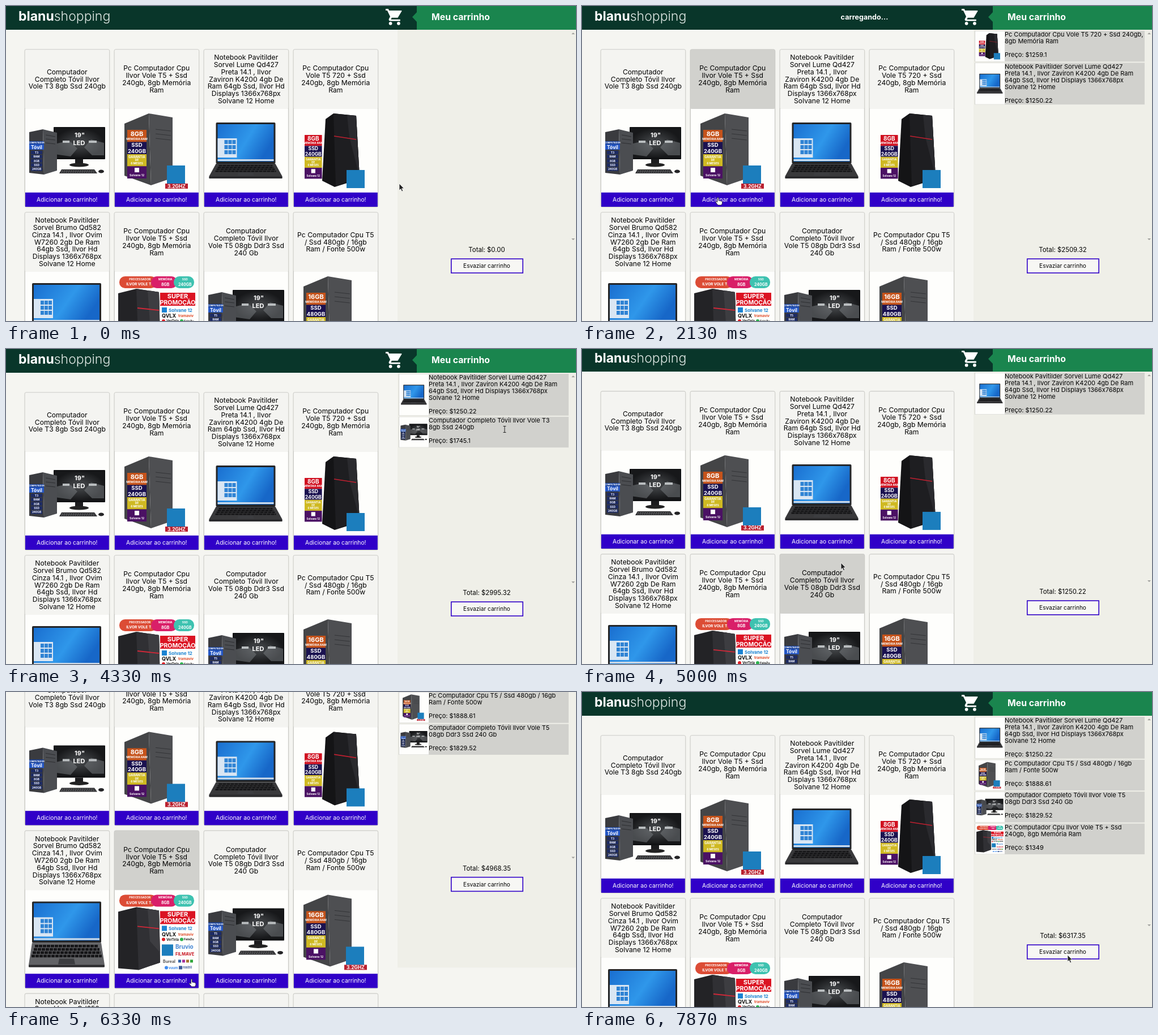
Write an HTML page that moves like this. It is 1006x557 px and loops after 8 s.

```html
<!DOCTYPE html>
<html lang="pt-BR">
<head>
<meta charset="utf-8">
<title>Carrinho</title>
<style>
  html, body { margin: 0; width: 100%; height: 100%; overflow: hidden; background: #f5f5f1; }
  svg { display: block; width: 1006px; height: 557px; font-family: Inter, sans-serif; }
</style>
</head>
<body>
<script>
// "|" breaks a line on the card, "~" breaks it in the cart.
const PRODUCTS = [
  ['Computador|Completo Tóvil Ilvor|Vole T3~8gb Ssd 240gb', 1745.1],
  ['Pc Computador Cpu|Ilvor Vole T5 + Ssd|~240gb, 8gb Memória|Ram', 1445.69],
  ['Notebook Pavitilder|Sorvel Lume Qd427|~Preta 14.1 , Ilvor|Zaviron K4200 4gb De|Ram~64gb Ssd, Ilvor Hd|Displays 1366x768px|~Solvane 12 Home', 1250.22],
  ['Pc Computador Cpu|Vole T5 720 + Ssd|240gb,~8gb Memória|Ram', 1259.1],
  ['Notebook Pavitilder|Sorvel Brumo Qd582|Cinza 14.1 , Ilvor Ovim|W7260 2gb De Ram|64gb Ssd, Ilvor Hd|Displays 1366x768px|Solvane 12 Home'],
  ['Pc Computador Cpu|Ilvor Vole T5 + Ssd|~240gb, 8gb Memória|Ram', 1349],
  ['Computador|Completo Tóvil Ilvor|Vole T5~08gb Ddr3 Ssd|240 Gb', 1829.52],
  ['Pc Computador Cpu T5|/ Ssd 480gb / 16gb|~Ram / Fonte 500w', 1888.61],
  ['Notebook Pavitilder|Sorvel Lume Qd250|Preta 14.1 , Ilvor|Zaviron K4200 4gb De|Ram 64gb Ssd, Ilvor Hd|Displays 1366x768px|Solvane 12 Home'],
  [''], [''], ['']
];

// Pointer stops: time, place and what the click there adds to or takes from the cart
const STOPS = [
  [0, 694, 314], [800, 580, 344, '+4'], [1530, 415, 342, '+3'], [1930, 240, 339, '+2'], [2470, 112, 340, '+1'],
  [3200, 884, 186], [3600, 888, 70, '-4'], [4130, 880, 142, '-2'], [4470, 880, 142, '-1'],
  [5000, 457, 378], [5330, 543, 454], [5600, 548, 503, '+8'], [6000, 395, 508, '+7'], [6400, 310, 508, '+6'],
  [6730, 579, 378], [7600, 890, 485], [7870, 857, 465]
];
const LATENCY = 270, TRAVEL = 240;

const rect = (x, y, w, h, fill, more = '') =>
  `<rect x="${x}" y="${y}" width="${w}" height="${h}" fill="${fill}" ${more}/>`;
const dot = (x, y, r, fill) => `<circle cx="${x}" cy="${y}" r="${r}" fill="${fill}"/>`;
const path = (d, fill, more = '') => `<path d="${d}" fill="${fill}" ${more}/>`;
const line = (d, color, more = '') => path(d, 'none', `stroke="${color}" ${more}`);
const group = (x, y, body, scale = 1) => `<g transform="translate(${x} ${y}) scale(${scale})">${body}</g>`;
const repeat = (count, make) => Array.from({ length: count }, (_, i) => make(i)).join('');
// Text placed by its vertical centre
const text = (x, y, str, size, fill = '#000', more = '') =>
  `<text x="${x}" y="${y + size * .36}" font-size="${size}" fill="${fill}" ${more}>${str}</text>`;
const MID = 'text-anchor="middle"', BOLD = 'font-weight="700"', BOLD_MID = MID + ' ' + BOLD;
const caption = (x, y, str, size) => text(x, y, str, size, '#fff', BOLD_MID);

// Product pictures, each in a 148 x 148 box
const badge = (x, y) => rect(x, y, 32, 32, '#1c7ebd');

const labels = (x, y, scale, ram, ssd, color) => group(x, y,
  ['MEMÓRIA RAM', ssd, '6 MESES', 'Solvane 12'].map((s, i) =>
    rect(0, i * 21.5, 34, 21.5, [color, '#1b1250', '#cfb922', '#4b1164'][i]) +
    caption(17, i * 21.5 + 16, s, i === 1 ? 9.5 : 5)).join('') +
  caption(17, 7, ram, 11) + caption(17, 27, 'SSD', 9.5) +
  caption(17, 48, 'GARANTIA', 5.5) + caption(17, 53.5, 'DE', 5) + rect(13, 67, 8, 8, '#fff'), scale);

const tower = (ram, ssd) =>
  path('M17 26 60 8 64 135 17 118z', '#444547') + path('M60 8 102 15V122L64 135z', '#4e4f52') +
  line('M72 36l27 3M72 44l27 3M72 52l27 3', '#333437') +
  labels(22, 37, 1, ram, ssd, '#c5531b') +
  badge(92, 100) + rect(89, 132, 40, 9, '#b9202f') + caption(109, 136.5, '3.2GHZ', 8.5);

const blackTower =
  path('M56 18 70 8 110 12 116 120 110 126 72 138 50 127z', '#141416') +
  path('M70 8 110 12 116 120 74 137z', '#1e1e21') + path('M94 11 110 12 116 120 98 50z', '#2a2a2e') +
  line('M71 48 110 54', '#c02030', 'stroke-width="1.6"') +
  labels(19, 46, .9, '8GB', '240GB', '#d01020') + badge(93, 108);

const desktop = chip =>
  rect(50, 32, 91, 57, '#111214', 'rx="1"') + rect(52, 34, 87, 52, 'url(#photo)') +
  path('M52 62 78 56 92 70 80 84 52 80zM139 60 116 54 104 68 118 82 139 82z', '#7d8083', 'opacity=".5"') +
  line('M66 58h12M112 58h14', '#b9bdbf', 'stroke-width="4"') +
  caption(96, 46, '19"', 11) + caption(95, 60, 'LED', 11) +
  rect(88, 89, 14, 9, '#1c1c1e') + '<ellipse cx="95" cy="99" rx="17" ry="3.5" fill="#222"/>' +
  path('M7 41 31 36 33 116 7 113z', '#3a3b3f') + path('M31 36 56 42V109L33 116z', '#4b4d51') +
  line('M36 46l17 3M36 53l17 2M36 60l17 2', '#2d2e31') +
  rect(7, 57, 26, 6, '#1d46a0') + caption(20, 60, 'COMPUTADOR', 3.8) +
  rect(7, 63, 26, 9, '#2456c4') + caption(20, 67.5, 'Tóvil', 8.5) +
  [chip, 'RAM', '8GB', 'SSD', '240GB'].map((s, i) =>
    rect(10, 74 + i * 7.4, 20, 6, '#1d2b63') + caption(20, 77 + i * 7.4, s, 4.8)).join('') +
  path('M64 107H122L127 114H60z', '#2a2a2c') +
  line('M64 109.5H122M63 112H124', '#77797c', 'stroke-dasharray="3 1"') +
  '<ellipse cx="134" cy="110.5" rx="5" ry="3" fill="#242426"/>';

const laptop = (width, top, overhang, depth, color) => {
  const left = 73 - width / 2, right = 73 + width / 2, hinge = top + 73, front = hinge + depth;
  return rect(left, top, width, 73, '#242527', 'rx="2"') +
    rect(left + 3, top + 3, width - 6, 66, 'url(#sky)') +
    rect(left + 3, top + 28, 34, 34, '#d9e6f3') +
    repeat(9, i => rect(left + 15 + i % 3 * 7, top + 31 + Math.floor(i / 3) * 9, 6, 7, '#2f83d4')) +
    rect(left + 3, hinge - 8, width - 6, 3, '#cfdbe8') +
    path(`M${left} ${hinge}H${right}L${right + overhang} ${front}v4H${left - overhang}v-4z`, color) +
    rect(left - overhang, front, width + 2 * overhang, 4, '#2b2b2d', 'rx="2"') +
    repeat(4, i => line(`M${left + 5 - i * 2} ${hinge + depth * (.15 + i * .15)}H${right - 5 + i * 2}`, '#151517',
      `stroke-width="${depth * .12}" stroke-dasharray="6 1"`)) +
    path(`M60 ${hinge + depth * .72}H86L88 ${front - 1}H58z`, '#3c3d40');
};

const pill = (x, w, color, top, bottom, size) => rect(x, 8, w, 21, color, 'rx="10"') +
  caption(x + w * .55, 13, top, 5) + caption(x + w * .55, 22, bottom, size);
const brand = (x, y, name, size, color) => text(x, y, name, size, color, BOLD);
const promo =
  pill(8, 66, '#dc4c35', 'PROCESSADOR', 'ILVOR VOLE T5', 6.6) +
  pill(64, 46, '#d91f68', 'MEMÓRIA', '8GB', 7) + pill(104, 36, '#3ec2b0', 'SSD', '240GB', 7) +
  path('M6 38 38 30 78 36 80 128 42 141 6 138z', '#232326') + path('M38 30 78 36 80 128 42 141z', '#303034') +
  path('M58 33 78 36 80 110 62 90z', '#3d3d41') + line('M40 64 78 68', '#d02838', 'stroke-width="1.8"') +
  rect(80, 37, 62, 23, '#db1322') + caption(111, 43, 'SUPER', 11) + caption(111, 54, 'PROMOÇÃO', 10.5) +
  rect(83, 63, 9, 9, '#1b83d2') + brand(95, 68, 'Solvane 12', 8, '#1b83d2') +
  brand(83, 78, 'QVLX', 9, '#111') + brand(112, 78, 'tramaviv', 6.3, '#e04a28') +
  dot(86, 87, 3, '#dd1c24') + brand(91, 87, 'VerTela', 6, '#222') +
  dot(118, 87, 3, '#2bb24c') + brand(122, 87, 'FalaZu', 5.4, '#222') +
  rect(83, 96, 20, 20, '#1c7ebd') + brand(107, 100, 'Bruvio', 10, '#4285d4') +
  brand(107, 113, 'FILMAVE', 7.6, '#c91824') + brand(85, 126, 'Bureal', 7, '#555') +
  repeat(4, i => rect(112 + i * 7, 123, 5, 5, `hsl(${215 + i * 90} 55% 42%)`)) +
  dot(91, 137, 3, '#3f8cf0') + brand(95, 137, 'vuum', 6, '#3f8cf0') +
  rect(113, 134, 6, 6, '#3b5998') + brand(120, 137, 'rostril', 5.6, '#3b5998');

const ART = [desktop('T3'), tower('8GB', '240GB'), laptop(105, 24, 12, 22, '#39393b'), blackTower,
  laptop(122, 20, 6, 39, '#626366'), promo, desktop('T5'), tower('16GB', '480GB')];

const card = ([title], i) => {
  const lines = title.split('|');
  return group(33.3 + i % 4 * 158, 77 + Math.floor(i / 4) * 288,
    rect(0, 0, 149.2, 278.2, '#f4f4f1', 'rx="3" stroke="#cbcbc7" stroke-width="1.6"') +
    rect(.3, .3, 148.6, 104.7, '#f4f4f1', 'class="head" rx="2"') +
    rect(.7, 105, 147.8, 148, '#fefefc') + (ART[i] ? `<use href="#art${i}" x=".7" y="105"/>` : '') +
    rect(.7, 252.8, 147.8, 25.2, '#3000c8') + text(74.5, 265, 'Adicionar ao carrinho!', 10.3, '#fff', MID) +
    lines.map((s, n) => text(74.5, 52.3 + (n - (lines.length - 1) / 2) * 12.8,
      s.replace('~', ' ').trim(), 12.2, '#000', MID)).join(''));
};

const cartLines = id => PRODUCTS[id - 1][0].split('~');
const rowHeight = id => cartLines(id).length > 2 ? 75.8 : 56.4;
const sumOf = (ids, value) => [...ids].reduce((sum, id) => sum + value(id), 0);

const cartList = ids => [...ids].map((id, i) => {
  const h = rowHeight(id) - 2;
  return group(693, 44 + sumOf(ids.slice(0, i), rowHeight),
    rect(0, 0, 300, h, '#d1d1cd') + rect(1, .5, 52, h - 1, '#fefefc') +
    group(1, (h - 52) / 2, `<use href="#art${id - 1}"/>`, .352) +
    [...cartLines(id), '', 'Preço: $' + PRODUCTS[id - 1][1]].map((s, n) =>
      text(53, 6.3 + n * 12, s.replaceAll('|', ' ').trim(), 11)).join(''));
}).join('');
const cartTotal = ids => 'Total: $' + (ids ? +sumOf(ids, id => PRODUCTS[id - 1][1]).toFixed(2) : '0.00');

document.body.innerHTML = `<svg viewBox="0 0 1006 557"><defs>
  <linearGradient id="sky" x2="1" y2=".4"><stop stop-color="#1a6fd0"/><stop offset=".6" stop-color="#2f97ea"/><stop offset="1" stop-color="#1767c8"/></linearGradient>
  <radialGradient id="photo"><stop stop-color="#4a4d50"/><stop offset="1" stop-color="#17181a"/></radialGradient>
  ${ART.map((body, i) => `<g id="art${i}">${body}</g>`).join('')}</defs>
  <g id="page">
    ${rect(691, 42, 315, 565, '#efefe8')}
    ${rect(0, 0, 1006, 42, '#09362a')}${path('M1006 0H725V11L717 19.5 725 28V42H1006z', '#1a854e')}
    <text x="22" y="26" font-size="23" fill="#fff" font-weight="700">blanu<tspan font-weight="300" fill="#dfe8e4">shopping</tspan></text>
    ${text(498.5, 19, 'carregando...', 12.6, '#fff', BOLD_MID + ' id="loading"')}
    ${group(668.6, 2.2, path('M1 2V4H3L6.6 11.6 5 14.5Q4.5 17 7 17H19V15H7.5L8.5 13H16L21 4.5 20.5 4H5.2L4.3 2z', '#fff') +
      dot(7, 20, 2, '#fff') + dot(17, 20, 2, '#fff'), 1.43)}
    ${text(751, 19, 'Meu carrinho', 15.8, '#fff', BOLD)}
    ${PRODUCTS.map(card).join('')}
    ${path('M998 50h6l-3-3zM998 411h6l-3 3z', '#a0a09c')}
    <g id="list"></g>
    ${text(848.5, 431.3, '', 11.4, '#000', MID + ' id="total"')}
    ${rect(785.8, 447.2, 126.4, 24.8, '#f7f7f4', 'stroke="#3000c8" stroke-width="1.6"')}
    ${text(848.5, 459.5, 'Esvaziar carrinho', 10.1, '#000', MID)}
  </g>
  <g id="pointer">
    <g>${path('M0 0V12L2.7 9.5 4.6 14 6.7 13.1 4.8 8.7H8.5z', '#222', 'stroke="#fff" stroke-width=".8"')}</g>
    <g>${path('M-1 0Q0-1 1 0V5L6 6Q8 7 7.5 10L6 13H0L-4 8Q-4 6-2 7L-1 8z', '#fff', 'stroke="#222" stroke-width=".8"')}</g>
    <g>${line('M-2.5-5.5H2.5M0-5.5V5.5M-2.5 5.5H2.5', '#222')}</g>
  </g></svg>`;

const el = id => document.getElementById(id);
const page = el('page'), list = el('list'), total = el('total'), loading = el('loading'), pointer = el('pointer');
const heads = [...document.querySelectorAll('.head')];
const smooth = (t, start, length) => {
  const p = Math.min(1, Math.max(0, (t - start) / length));
  return p * p * (3 - 2 * p);
};

// Adding waits for the answer, removing is immediate.
const cartAt = t => STOPS.reduce((ids, [at, , , click = '']) => {
  const [action, id] = click;
  if (action === '+' && t >= at + LATENCY) return ids + id;
  return action === '-' && t >= at ? ids.replace(id, '') : ids;
}, '');
const isLoading = t => STOPS.some(([at, , , click]) => click?.[0] === '+' && t >= at && t < at + LATENCY);

const pointerAt = t => {
  const i = STOPS.findLastIndex(([at]) => at <= t);
  const [, x, y] = STOPS[i], [at, nextX, nextY] = STOPS[i + 1] ?? STOPS[i];
  const p = smooth(t, at - TRAVEL, TRAVEL);
  return [x + (nextX - x) * p, y + (nextY - y) * p];
};

let shown = null;
function draw(t) {
  const scroll = 119.6 * (smooth(t, 4975, 320) - smooth(t, 6808, 278));
  page.setAttribute('transform', `translate(0 ${-scroll})`);

  const ids = cartAt(t);
  if (ids !== shown) {
    list.innerHTML = cartList(ids);
    total.textContent = cartTotal(ids);
    shown = ids;
  }
  loading.style.display = isLoading(t) ? '' : 'none';

  const [x, y] = pointerAt(t), px = x - 33, py = y + scroll - 77;
  const onCard = px >= 0 && px < 624 && py >= 0 && px % 158 < 150 && py % 288 < 279;
  const hovered = onCard ? Math.floor(py / 288) * 4 + Math.floor(px / 158) : -1;
  heads.forEach((head, i) => head.setAttribute('fill', i === hovered ? '#d1d1cd' : '#f4f4f1'));

  const onText = x > 746 && x < 993 && y + scroll < 44 + sumOf(ids, rowHeight);
  const kind = onCard && py % 288 > 253 ? 1 : onText ? 2 : 0;
  [...pointer.children].forEach((shape, i) => shape.style.display = i === kind ? '' : 'none');
  pointer.setAttribute('transform', `translate(${x} ${y})`);
}

// The picture ticks 15 times a second, on times rounded to 10 ms.
const begin = performance.now();
function tick() {
  const step = Math.floor((performance.now() - begin) % 8000 * .015 + .06) % 120;
  draw(Math.round(step * 100 / 15) * 10);
  requestAnimationFrame(tick);
}
tick();
</script>
</body>
</html>
```
